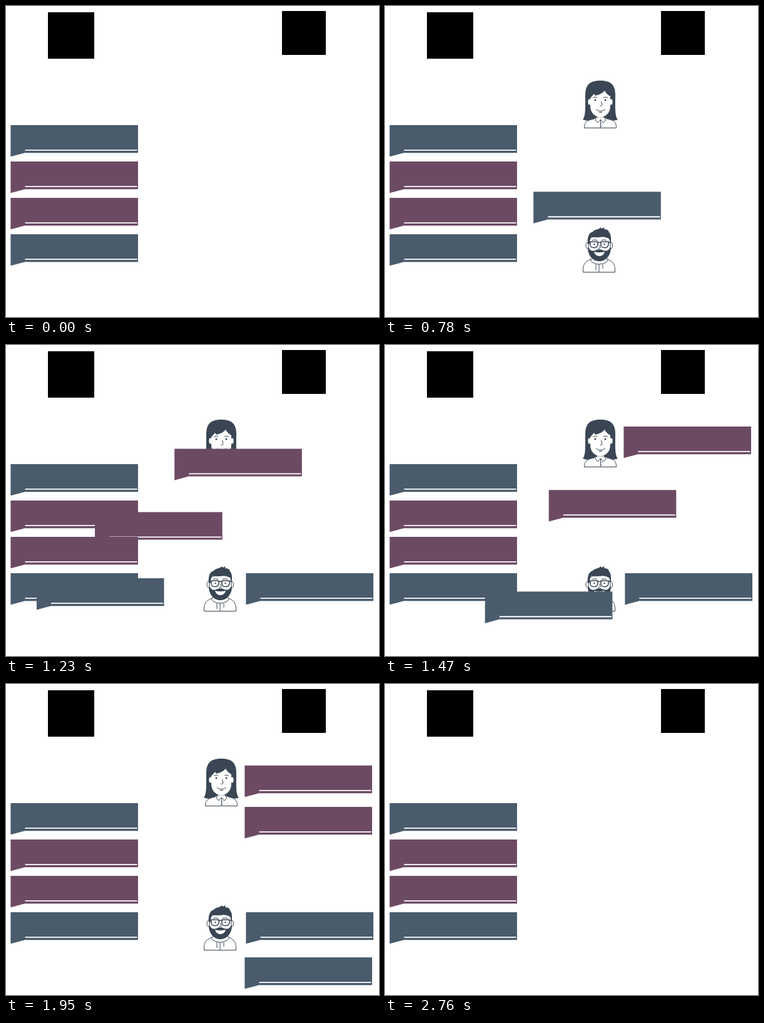
An HTML page with a canvas for the animation above (3.27 s loop, 596x496 px).

```html
<!DOCTYPE html>
<html lang="en">
<head>
<meta charset="utf-8">
<title>Messages sorted by sender</title>
<style>
  html, body { margin: 0; width: 100%; height: 100%; overflow: hidden; background: #fff; }
  canvas { display: block; }
</style>
</head>
<body>
<canvas id="stage" width="596" height="496"></canvas>
<script>
const ctx = document.getElementById('stage').getContext('2d');
const LOOP = 3270, STEP = 30;
const BLUE = '#4a5b6c', PLUM = '#6d4a64', INK = '#3a4654', WHITE = '#fff';

// Speech bubble with a see-through rule near its bottom edge.
const bubbleShape = new Path2D(
  'M.4 0H204V44.2H23L.4 50.3Z M23.5 39V40.8H202.6V39Z');

const messages = [
  { color: BLUE, from: [7, 190], to: [383, 364], start: 450, length: 540 },
  { color: PLUM, from: [7, 248], to: [381, 130], start: 810, length: 600 },
  { color: PLUM, from: [7, 306], to: [381, 196], start: 960, length: 750 },
  { color: BLUE, from: [7, 364], to: [381, 436], start: 1140, length: 810 }
];

const clamp = v => Math.max(0, Math.min(1, v));
const progress = (t, start, length) => clamp((t - start) / length);

function fill(d, color) {
  ctx.fillStyle = color;
  ctx.fill(new Path2D(d));
}

function line(d, width = 1) {
  ctx.strokeStyle = INK;
  ctx.lineWidth = width;
  ctx.stroke(new Path2D(d));
}

function outlined(d, width = 1) {
  fill(d, WHITE);
  line(d, width);
}

function oval(x, y, rx, ry, color, edge) {
  ctx.beginPath();
  ctx.ellipse(x, y, rx, ry, 0, 0, Math.PI * 2);
  ctx.fillStyle = color;
  ctx.fill();
  if (edge) {
    ctx.strokeStyle = INK;
    ctx.lineWidth = 1;
    ctx.stroke();
  }
}

function drawWoman() {
  fill('M316 181C321 176 320 160 320 142C320 125 328 119 344 119S368 125 368 142' +
       'C368 160 367 176 372 181C366 184 359 182 354 180H334C328 183 322 184 316 181Z', INK);
  outlined('M318.5 194.5C318 185 324 182 334 180L338 177H350L355 180C365 182 370 185 369.5 194.5Z');
  oval(326.5, 153, 2.6, 5, WHITE, true);
  oval(361.5, 153, 2.6, 5, WHITE, true);
  fill('M328 147L334 140L336 143Q346 141 351 135Q354 141 360 144V160' +
       'C360 170 352 177.5 344 177.5S328 170 328 160Z', WHITE);
  line('M332 146.5Q336 144 339 146M349 146Q353 144 356 146.5');
  oval(336, 150, 1.5, 1.5, INK);
  oval(352, 150, 1.5, 1.5, INK);
  line('M345.5 152L347 158Q346 160 343.5 159.5M337 165Q344 170.5 352 165M342 169.5H347');
  line('M338 177L336 182L340 186L344.5 181L349 186L353 182L350 177M344.5 181V194');
  oval(346.5, 187, .7, .7, INK);
  oval(346.5, 191.5, .7, .7, INK);
}

function drawMan() {
  outlined('M316.5 424.5C316 412 319 408 329 404L333 400H352L356 404C365 408 368 412 367.5 424.5Z');
  line('M329 404Q327 410 342 412Q357 410 356 404M337 412V421M348 412V419M342 412V424');
  oval(323.5, 382, 2.4, 5, WHITE, true);
  oval(361, 382, 2.4, 5, WHITE, true);
  outlined('M325 371Q342 363 360 371V391Q357 404 342 405Q328 404 325 391Z');
  fill('M324 380C323 370 325 362 332 360C335 356 341 357 345 353L346 355L351 353L350 356' +
       'Q357 356 358 361C362 365 361 373 361 380L358 371Q354 368 349 368Q337 370 330 368Q327 372 326.5 380Z', INK);
  fill('M324.5 384L328 389Q332 392 338 389Q342 387 347 389Q353 392 357 389L360.5 384' +
       'C361 397 354 407 342.5 407S324 397 324.5 384Z', INK);
  fill('M334 392Q342 394 351 392Q349 399 342.5 399T334 392Z', WHITE);
  line('M331 374Q335 372 339 374M346 374Q350 372 354 374', 1.2);
  outlined('M328 376H340V381Q339 385.5 334 385.5Q328.5 385.5 328 381Z' +
           'M345 376H357V381Q356 385.5 351 385.5Q345.5 385.5 345 381Z', 1.5);
  line('M340 378Q342.5 376.5 345 378M324 377H328M357 377H361', 1.4);
  oval(334.5, 380, 1.2, 1.2, INK);
  oval(350.5, 380, 1.2, 1.2, INK);
  line('M343 381L344 386Q342 387 340.5 386.5');
}

function drawScaled(x, y, scale, draw) {
  ctx.save();
  ctx.translate(x, y);
  ctx.scale(scale, scale);
  ctx.translate(-x, -y);
  draw();
  ctx.restore();
}

function drawBubble(x, y, color) {
  ctx.save();
  ctx.translate(x, y);
  ctx.fillStyle = color;
  ctx.fill(bubbleShape, 'evenodd');
  ctx.restore();
}

function overshoot(p, strength = 3.3) {
  const u = p - 1;
  return 1 + (strength + 1) * u ** 3 + strength * u ** 2;
}

function drawScene(t) {
  ctx.fillStyle = WHITE;
  ctx.fillRect(0, 0, 596, 496);

  ctx.fillStyle = '#000';
  ctx.fillRect(67, 10, 74, 74);
  ctx.fillRect(441, 8, 70, 70);

  for (const m of messages) drawBubble(...m.from, m.color);

  const pop = progress(t, 60, 360);
  if (pop > 0) {
    const scale = overshoot(pop);
    drawScaled(344, 157, scale, drawWoman);
    drawScaled(342, 389, scale, drawMan);
  }

  for (const m of messages) {
    const p = progress(t, m.start, m.length);
    if (p === 0) continue;
    const [x, y] = m.from.map((v, i) => v + (m.to[i] - v) * p);
    drawBubble(x, y, m.color);
  }

  // The sorted side fades out to the white background.
  const fade = progress(t, 2640, 120);
  if (fade > 0) {
    ctx.fillStyle = `rgba(255,255,255,${fade})`;
    ctx.fillRect(300, 100, 296, 396);
  }
}

const origin = performance.now();
function tick() {
  const t = (performance.now() - origin) % LOOP;
  drawScene(Math.floor(t / STEP) * STEP);
  requestAnimationFrame(tick);
}
tick();
</script>
</body>
</html>
```
